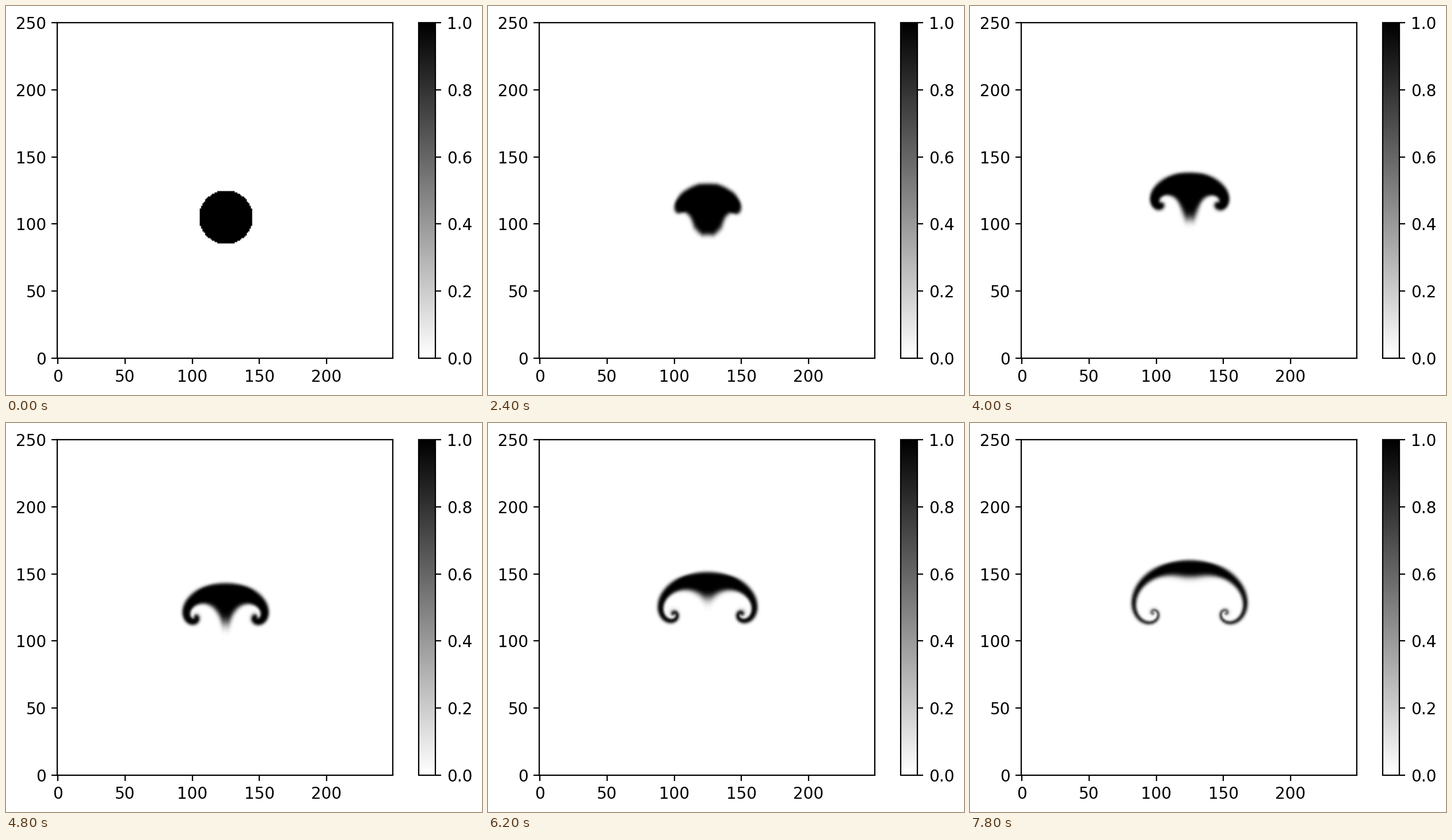
A matplotlib script for the animation above (8000 ms loop, 827x677 px).

```python
import numpy as np
import matplotlib.pyplot as plt
from matplotlib.animation import FuncAnimation

W, H, DPI = 827, 677, 200
N = 250            # grid cells per side
FRAMES = 40
MID = 124.7        # symmetry line of the flow
PUSH = 63          # growth of the central updraft per step
CORE = 8           # radius of the vortex cores

rows, cols = np.mgrid[0:N, 0:N].astype(float)


def swirl(x0, y0, strength):
    """Velocity of one counterclockwise vortex with a soft core."""
    dx, dy = cols - x0, rows - y0
    spin = strength / (dx ** 2 + dy ** 2 + CORE ** 2)
    return np.array([-spin * dy, spin * dx])


def flow(t):
    """A rising vortex pair that strengthens steadily and drifts apart."""
    half = 19.6 + 7 * (1 - np.exp(-(t / 30) ** 3))
    height = 103.5 + 17.5 * (1 - np.exp(-(t / 20) ** 2))
    strength = PUSH * t / (2 * half)
    return (swirl(MID - half, height, strength)
            + swirl(MID + half, height, -strength))


def advect(f, u, v):
    """Trace back along the flow and sample bilinearly."""
    x = np.clip(cols - u, 0, N - 1.001)
    y = np.clip(rows - v, 0, N - 1.001)
    i, j = x.astype(int), y.astype(int)
    fx, fy = x - i, y - j
    return ((1 - fy) * ((1 - fx) * f[j, i] + fx * f[j, i + 1])
            + fy * ((1 - fx) * f[j + 1, i] + fx * f[j + 1, i + 1]))


def simulate():
    smoke = ((cols - 125) ** 2 + (rows - 105) ** 2 < 20 ** 2).astype(float)
    history = [smoke]
    for t in range(1, FRAMES):
        smoke = advect(smoke, *flow(t))
        history.append(smoke)
    return history


def add_axes(left, top, width, height):
    return fig.add_axes([left / W, 1 - (top + height) / H,
                         width / W, height / H])


history = simulate()

fig = plt.figure(figsize=(W / DPI, H / DPI), dpi=DPI, facecolor="white")
ax = add_axes(89.2, 29.3, 583.2, 583.4)
image = ax.imshow(history[0], cmap="binary", vmin=0, vmax=1,
                  origin="lower", aspect="auto")
ax.set_ylim(0, N)
ax.set_xticks(range(0, N, 50))
ax.set_yticks(range(0, N + 1, 50))
fig.colorbar(image, cax=add_axes(717.3, 29.3, 29.15, 583.4))


def update(n):
    image.set_data(history[n])
    return [image]


anim = FuncAnimation(fig, update, frames=FRAMES, interval=200,
                     repeat=True, blit=False)
plt.show()
```
